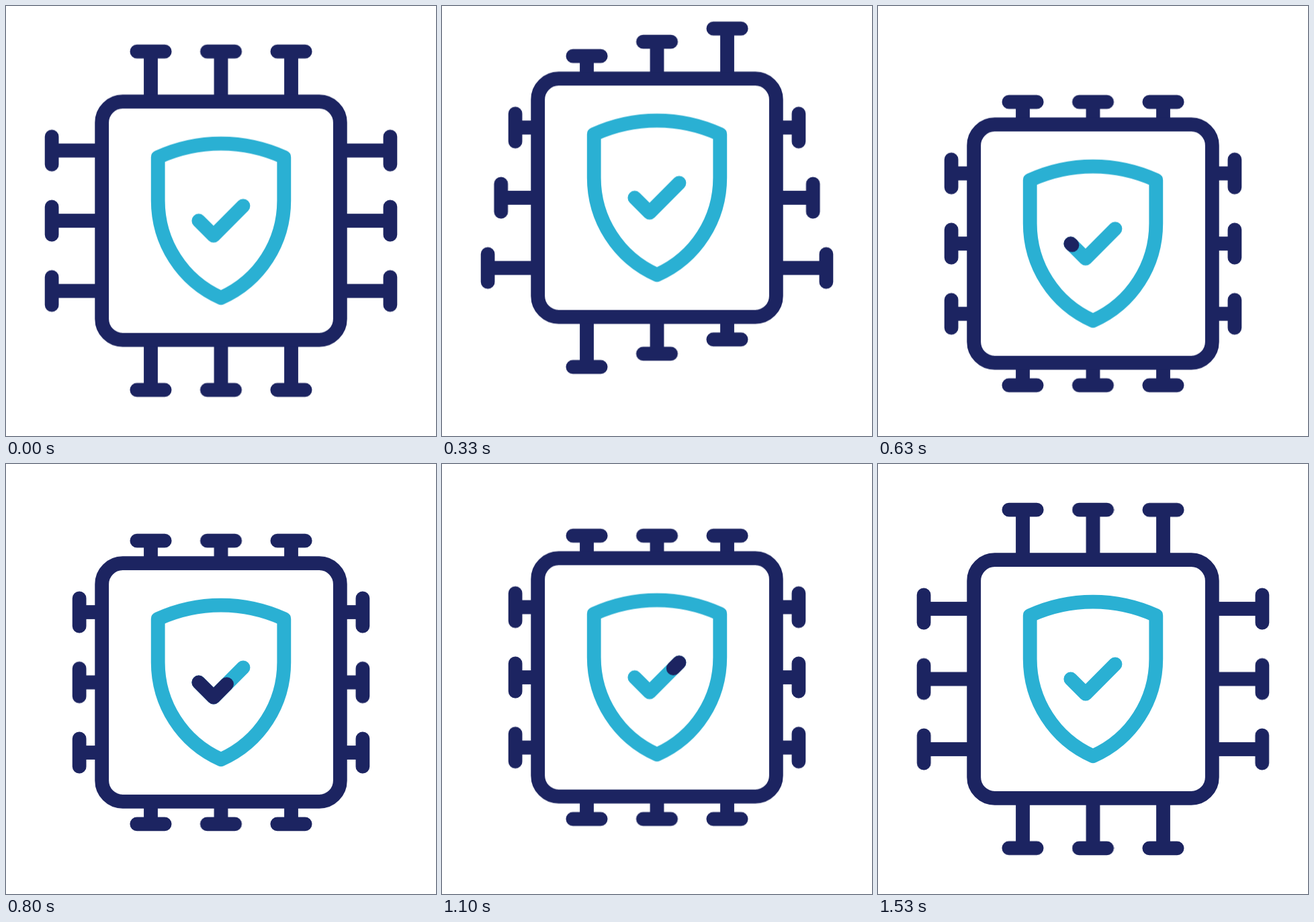
Animation of 640x640 px, one loop 1.67 s. Source, as an HTML page without scripts:

```html
<!DOCTYPE html>
<html lang="en">
<head>
<meta charset="utf-8">
<title>Secure chip</title>
<style>
  @property --from { syntax: "<length>"; inherits: false; initial-value: 0px; }
  @property --to { syntax: "<length>"; inherits: false; initial-value: 0px; }

  :root { --navy: #1c2461; --teal: #2ab0d3; }
  html, body { margin: 0; width: 100%; height: 100%; overflow: hidden; background: #fff; }
  svg { display: block; width: 100vw; height: 100vh; }

  path, rect {
    fill: none;
    stroke: var(--navy);
    stroke-width: 20.8px;
    stroke-linecap: round;
    stroke-linejoin: round;
  }
  .case { fill: #fff; }
  .teal { stroke: var(--teal); }

  .chip, .first, .second, .third, .trace {
    animation: 1670ms cubic-bezier(.25, 0, .75, 1) infinite;
  }
  .chip { animation-name: bounce; }
  .first { animation-name: pin-first; }
  .second { animation-name: pin-second; }
  .third { animation-name: pin-third; }
  .trace {
    animation-name: trace, show;
    stroke-dasharray: calc(var(--to) - var(--from)) 300px;
    stroke-dashoffset: calc(0px - var(--from));
  }

  @keyframes bounce {
    0% { transform: translateY(0); }
    20% { transform: translateY(-34.6px); }
    22.3% { transform: translateY(-34.6px); animation-timing-function: cubic-bezier(.52, 0, .67, 1); }
    39% { transform: translateY(34.8px); }
    56% { transform: translateY(-20.7px); }
    72% { transform: translateY(7px); }
    86%, 100% { transform: translateY(0); }
  }

  /* Pins slide in one after another, then out in the same order. */
  @keyframes pin-first {
    0%, 8%, 84%, 100% { transform: translateY(0); }
    20%, 72% { transform: translateY(41px); }
  }
  @keyframes pin-second {
    0%, 14%, 88%, 100% { transform: translateY(0); }
    26%, 76% { transform: translateY(41px); }
  }
  @keyframes pin-third {
    0%, 20%, 92%, 100% { transform: translateY(0); }
    32%, 80% { transform: translateY(41px); }
  }

  @keyframes trace {
    0%, 36% { --to: 0px; }
    56%, 100% { --to: 100px; }
    0%, 50% { --from: 0px; }
    70%, 100% { --from: 100px; }
  }
  @keyframes show {
    0%, 36% { visibility: hidden; }
    36.01%, 69.5% { visibility: visible; }
    69.51%, 100% { visibility: hidden; }
  }
</style>
</head>
<body>
<svg viewBox="0 0 640 640">
  <defs>
    <path id="pin" d="M194.9 68.2H236.2M215.5 68.2V138"/>
  </defs>
  <g class="chip">
    <g>
      <use class="first" href="#pin"/>
      <use class="second" href="#pin" x="104.5"/>
      <use class="third" href="#pin" x="209"/>
    </g>
    <g transform="rotate(180 320 320)">
      <use class="first" href="#pin"/>
      <use class="second" href="#pin" x="104.5"/>
      <use class="third" href="#pin" x="209"/>
    </g>
    <g transform="matrix(0 1 1 0 0 0)">
      <use class="first" href="#pin"/>
      <use class="second" href="#pin" x="104.5"/>
      <use class="third" href="#pin" x="209"/>
    </g>
    <g transform="matrix(0 1 -1 0 640 0)">
      <use class="first" href="#pin"/>
      <use class="second" href="#pin" x="104.5"/>
      <use class="third" href="#pin" x="209"/>
    </g>
    <rect class="case" x="142.7" y="142.7" width="354.6" height="354.6" rx="31"/>
    <path class="teal" d="M226.2 225.5A226 226 0 0 1 413.8 225.5V290C413.8 352 378 409 320 434.8C262 409 226.2 352 226.2 290Z"/>
    <path class="teal" d="M286.8 320L309 342.2L353 297.9"/>
    <path class="trace" d="M286.8 320L309 342.2L353 297.9" pathLength="100"/>
  </g>
</svg>
</body>
</html>
```
